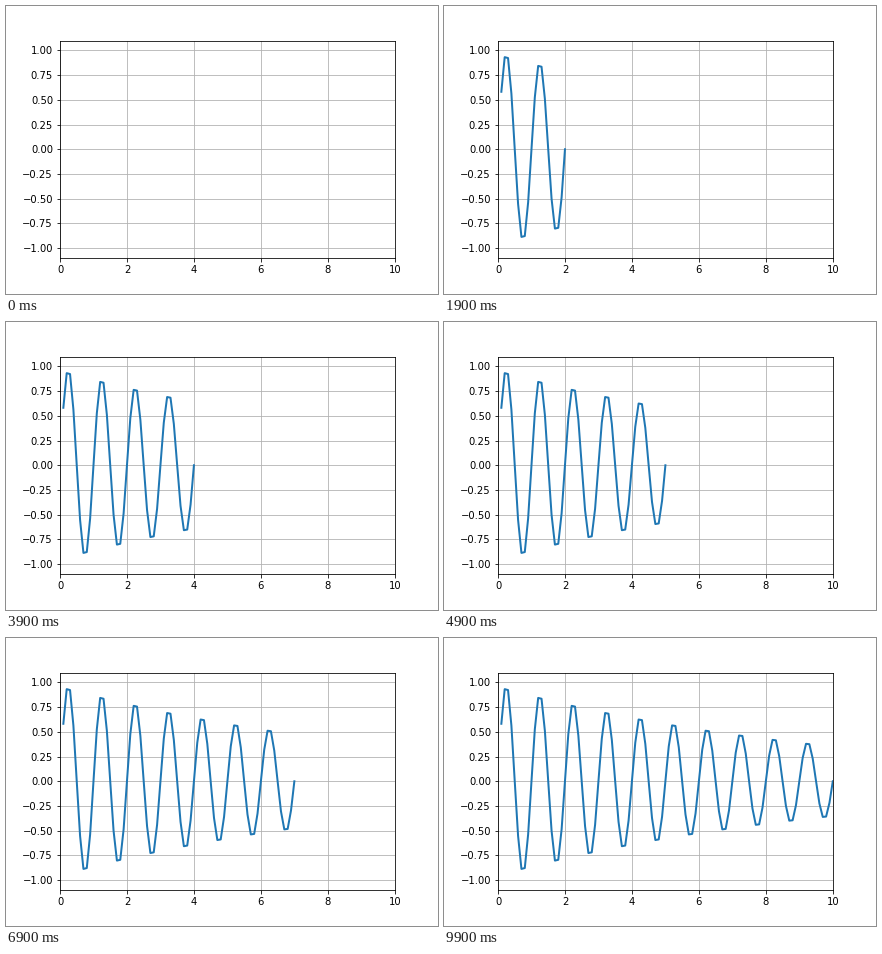
Write a matplotlib script that moves like this. It is 432 by 288 pixels and loops after 10000 ms.

```python
import numpy as np
import matplotlib.pyplot as plt
from matplotlib.animation import FuncAnimation

FRAMES = 100
INTERVAL = 100  # ms

t = 0.1 * np.arange(1, FRAMES + 1)
y = np.sin(2 * np.pi * t) * np.exp(-t / 10)

plt.rcParams["font.family"] = "DejaVu Sans"
plt.rcParams["font.size"] = 10

fig, ax = plt.subplots(figsize=(6, 4), dpi=72)
fig.subplots_adjust(left=0.125, right=0.9, bottom=0.125, top=0.88)
ax.set_xlim(0, 10)
ax.set_ylim(-1.1, 1.1)
ax.grid()
line, = ax.plot([], [], lw=2)


def init():
    line.set_data([], [])
    return line,


def update(i):
    line.set_data(t[:i + 1], y[:i + 1])
    return line,


anim = FuncAnimation(fig, update, frames=FRAMES, init_func=init,
                     interval=INTERVAL, repeat=True, repeat_delay=0)
plt.show()
```
